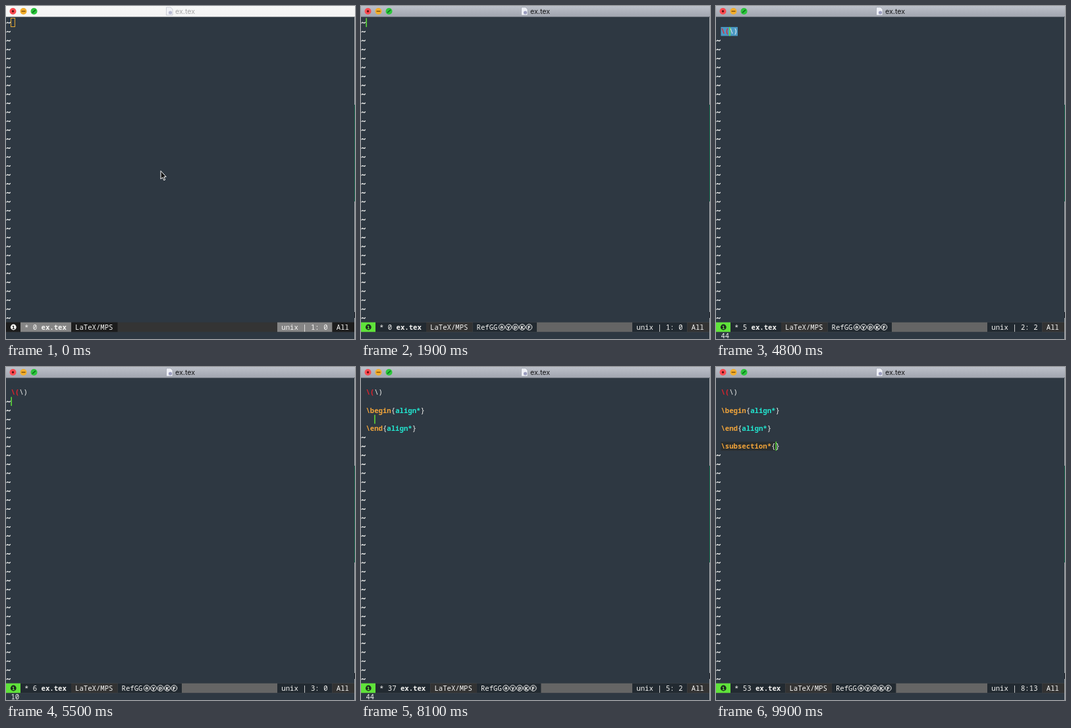
These frames come from a looping animation (530x506 px, 10 s). An HTML page with a canvas:

```html
<!DOCTYPE html>
<html lang="en">
<head>
<meta charset="utf-8">
<title>ex.tex</title>
<style>
html, body { margin: 0; width: 100%; height: 100%; overflow: hidden; background: #2e3842; }
canvas { display: block; }
</style>
</head>
<body>
<canvas id="stage" width="530" height="506"></canvas>
<script>
const ctx = document.getElementById('stage').getContext('2d');
const LOOP = 10000, LEFT = 7.4, TOP = 18.3, ROW = 13.6, ROWS = 34, SIZE = 10.65, CHAR = SIZE * 0.6;
const BG = '#2e3842', GREEN = '#5fe33a', GOLD = '#e5a832', WHITE = '#f4f4f2';
const MONO = '"Noto Sans Mono", "DejaVu Sans Mono", monospace';

const math = '\n\\(\\)';
const align = math + '\n\n\\begin{align*}\n  \n\\end{align*}';

// Each step: start time, buffer text, echo area, cursor distance from the end
const steps = [
  [0, '', '', 0],
  [2300, '\n', '10', 0],
  [3600, '\nm', '10', 0],
  [3800, '\nm,', '44', 0],
  [4000, math, '44', 2],
  [5100, math, '44', 0],
  [5400, math + '\n', '10', 0],
  [6000, math + '\n\n', '10', 0],
  [7300, math + '\n\na', '10', 0],
  [7500, math + '\n\nal', '10', 0],
  [7700, math + '\n\nal,', '44', 0],
  [7900, align, '44', 13],
  [8400, align, '44', 0],
  [8600, align + '\n', '10', 0],
  [9100, align + '\n\n', '10', 0],
  [9400, align + '\n\ns', '10', 0],
  [9500, align + '\n\nsu', '10', 0],
  [9600, align + '\n\nsu,', '44', 0],
  [9700, align + '\n\n\\subsection*{}', '', 1]
];
const FOCUS = 1200, ACTIVE = 1300, INSERT = 1700;

function rect(x, y, w, h, color) {
  ctx.fillStyle = color;
  ctx.fillRect(x, y, w, h);
}

function circle(x, y, r, color) {
  ctx.fillStyle = color;
  ctx.beginPath();
  ctx.arc(x, y, r, 0, 7);
  ctx.fill();
}

function line(points, color, width) {
  ctx.strokeStyle = color;
  ctx.lineWidth = width;
  ctx.beginPath();
  points.forEach(([x, y]) => ctx.lineTo(x, y));
  ctx.stroke();
}

function label(text, x, y, color = WHITE, weight = 500, size = SIZE, family = MONO) {
  ctx.fillStyle = color;
  ctx.font = `${weight} ${size}px ${family}`;
  ctx.fillText(text, x, y);
}

function titleBar(focused) {
  const shade = ctx.createLinearGradient(0, 0, 0, 17);
  shade.addColorStop(0, focused ? '#bcc0c9' : '#f7f7f7');
  shade.addColorStop(1, focused ? '#a0a4ae' : '#f3f3f3');
  rect(0, 0, 530, 16.5, shade);
  ['#fb4a50', '#f3ae2c', '#2cc63c'].forEach((color, i) => circle(10.5 + 16 * i, 8, 5, color));
  circle(10.5, 8, 1.7, '#5c0d12');
  line([[23.5, 8], [29.5, 8]], '#7b4c08', 1.4);
  line([[40, 10.3], [45, 5.7]], '#08691a', 1.5);

  ctx.globalAlpha = focused ? 1 : 0.65;
  ctx.beginPath();
  [[243.5, 2], [250, 2], [253, 5], [253, 14], [243.5, 14]].forEach(([x, y]) => ctx.lineTo(x, y));
  ctx.closePath();
  ctx.fillStyle = '#eef0f6';
  ctx.fill();
  ctx.strokeStyle = '#9297a5';
  ctx.lineWidth = 0.6;
  ctx.stroke();
  circle(249.5, 10, 2.6, '#9a9cbe');
  ctx.globalAlpha = 1;
  label('ex.tex', 257, 11.8, focused ? '#161719' : '#a9a9a9', 400, 10.7, 'Inter, "Liberation Sans", sans-serif');
}

function tilde(y) {
  ctx.strokeStyle = WHITE;
  ctx.lineWidth = 1.3;
  ctx.beginPath();
  ctx.moveTo(1, y + 1.2);
  ctx.bezierCurveTo(2.6, y - 3.2, 4.6, y + 3.6, 6.6, y - 1);
  ctx.stroke();
}

function tokenStyle(token) {
  if (token === '\\(') return ['#e8202c', 700];
  if (/^\\\w/.test(token)) return ['#f1a43a', 700];
  if (token === 'align*') return ['#22e6d0', 700];
  return [WHITE, 500];
}

function codeLine(text, row) {
  let col = 0;
  for (const token of text.match(/\\[a-z]+\*?|\\[()]|align\*|./g) || []) {
    label(token, LEFT + col * CHAR, TOP + row * ROW + 10.5, ...tokenStyle(token));
    col += token.length;
  }
}

function cursor(x, y, time) {
  if (time < FOCUS) {
    ctx.strokeStyle = GOLD;
    ctx.lineWidth = 1;
    ctx.strokeRect(7.5, 18.5, 6, 13);
  } else if (time < INSERT) {
    rect(7, 18, 7, 14, GOLD);
  } else {
    rect(x, y, 1.5, ROW, GREEN);
  }
}

function buffer(text, row, col, time) {
  const lines = text.split('\n'), last = lines.length - 1;
  const y = TOP + row * ROW, x = LEFT + col * CHAR;
  if (text === math && col === 2) rect(LEFT, y, 4 * CHAR, ROW, '#4b99c4');
  if (lines[row].startsWith('\\sub')) rect(LEFT, y, 13 * CHAR, ROW, '#292e30');
  lines.forEach(codeLine);
  for (let i = lines[last] ? last + 1 : last; i < ROWS; i++) tilde(TOP + i * ROW + 7);
  cursor(x, y, time);
}

function minorModes(x) {
  label('RefGG', x, 492);
  ctx.textAlign = 'center';
  [...'aypKF'].forEach((letter, i) => {
    const cx = x + 38.2 + i * 10.4;
    ctx.strokeStyle = WHITE;
    ctx.lineWidth = 1;
    ctx.beginPath();
    ctx.arc(cx, 488, 4.4, 0, 7);
    ctx.stroke();
    label(letter, cx, letter > 'Z' ? 489.8 : 490.5, WHITE, 600, 7, '"DejaVu Sans", sans-serif');
  });
  ctx.textAlign = 'left';
}

function modeLine(count, row, col, time) {
  const active = time >= ACTIVE;
  const dark = active ? '#222a31' : '#858585', side = active ? '#333333' : '#1c1c1c';
  const state = !active ? '#1c1c1c' : time < INSERT ? GOLD : GREEN;
  const shift = (String(count).length - 1) * CHAR;
  const y = 480.7, h = 14.5;

  rect(0, y, 530, h, active ? '#656565' : '#343434');
  rect(0, y, 22, h, state);
  rect(22, y, 77 + shift, h, dark);
  rect(99 + shift, y, 70.5, h, side);
  rect(412, y, 83.5, h, dark);
  rect(495.5, y, 34.5, h, side);

  circle(11.3, 488, 4.4, active ? '#1d2a20' : WHITE);
  ctx.textAlign = 'center';
  label('1', 11.3, 490.6, state, 700, 7, '"DejaVu Sans", sans-serif');
  ctx.textAlign = 'left';

  label(`* ${count} `, 28, 492);
  label('ex.tex', 28 + 4 * CHAR + shift, 492, WHITE, 700);
  label('LaTeX/MPS', 105 + shift, 492);
  if (active) {
    rect(169.5 + shift, y, 97.5, h, dark);
    minorModes(175.5 + shift);
  }
  label(`unix | ${row + 1}:${String(col).padStart(2)}`, 418.3, 492);
  label('All', 501.8, 492);
}

function pointer() {
  ctx.beginPath();
  [[235, 250.5], [235, 263], [237.8, 260.4], [239.8, 264.8], [241.7, 264], [239.8, 259.8], [243.2, 259.5]]
    .forEach(([x, y]) => ctx.lineTo(x, y));
  ctx.closePath();
  ctx.fillStyle = '#111';
  ctx.fill();
  ctx.strokeStyle = '#fff';
  ctx.lineWidth = 1;
  ctx.stroke();
}

function draw(time) {
  const [, text, echo, back] = steps.findLast(step => step[0] <= time);
  const before = text.slice(0, text.length - back).split('\n');
  const row = before.length - 1, col = before[row].length;

  rect(0, 0, 530, 506, BG);
  titleBar(time >= FOCUS);
  buffer(text, row, col, time);
  if (time < INSERT) pointer();
  modeLine(text.length, row, col, time);
  label(echo, 7.4, 505.4);

  // Desktop showing along the window edge
  rect(529, 17, 1, 489, '#a9adb0');
  rect(529, 150, 1, 147, '#17694f');
  rect(529, 465, 1, 9, '#20242b');
}

function frame() {
  draw(performance.now() % LOOP);
  requestAnimationFrame(frame);
}
frame();
</script>
</body>
</html>
```
